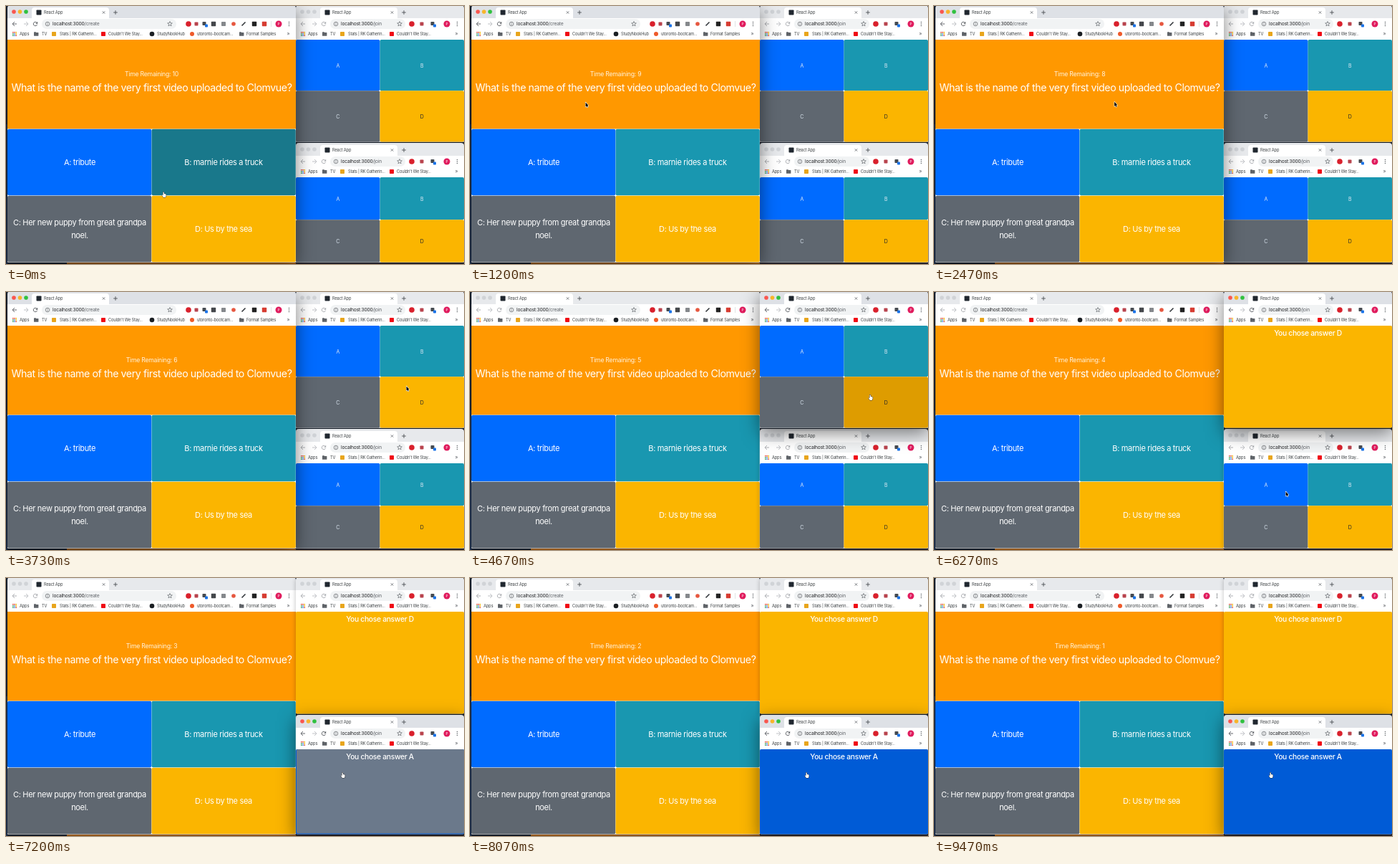
These frames come from a looping animation (640 by 360 pixels, 9540 ms). An HTML page with a canvas:

```html
<!DOCTYPE html>
<html lang="en">
<head>
<meta charset="utf-8">
<title>Quiz</title>
<style>
html, body { margin: 0; width: 100%; height: 100%; overflow: hidden; background: #17202e; }
canvas { display: block; width: 640px; height: 360px; }
</style>
</head>
<body>
<canvas id="stage"></canvas>
<script>
const LOOP = 9540;
const canvas = document.getElementById('stage');
const ctx = canvas.getContext('2d');
const ratio = window.devicePixelRatio || 1;
canvas.width = 640 * ratio;
canvas.height = 360 * ratio;

const COLORS = {
  A: ['#006bff', '#005bd6'],
  B: ['#1997b0', '#19788b'],
  C: ['#5f6770', '#50575f'],
  D: ['#fbb500', '#de9c00']
};
const WINDOWS = [
  { x: 2, y: -1, w: 403, h: 358.5, path: 'create' },
  { x: 405, y: -1, w: 235, h: 190.5, path: 'join' },
  { x: 405, y: 191, w: 235, h: 166.5, path: 'join' }
];
const FOCUS_TIMES = [4450, 6800];
const CHOICES = [null, { at: 4700, answer: 'D' }, { at: 7100, answer: 'A' }];
const CURSOR = [
  [0, 221, 263], [950, 162, 138], [2100, 162, 138], [3300, 560, 135], [3900, 560, 135],
  [4350, 560, 147], [5250, 560, 147], [6100, 492, 282], [6400, 492, 282], [6800, 471, 275]
];

function rect(x, y, w, h, color, r = 0) {
  ctx.fillStyle = color;
  ctx.beginPath();
  ctx.roundRect(x, y, w, h, r);
  ctx.fill();
}

function dot(x, y, r, color) {
  ctx.fillStyle = color;
  ctx.beginPath();
  ctx.arc(x, y, r, 0, Math.PI * 2);
  ctx.fill();
}

function square(x, y, size, color) {
  rect(x - size / 2, y - size / 2, size, size, color, 0.8);
}

function stroke(points, color, width = 0.9) {
  ctx.strokeStyle = color;
  ctx.lineWidth = width;
  ctx.beginPath();
  points.forEach(([x, y]) => ctx.lineTo(x, y));
  ctx.stroke();
}

function text(str, x, y, size, color, align = 'left', weight = 400) {
  ctx.font = `${weight} ${size}px Inter, "Liberation Sans", sans-serif`;
  ctx.letterSpacing = `${-0.03 * size}px`;
  ctx.textAlign = align;
  ctx.fillStyle = color;
  ctx.fillText(str, x, y + size * 0.36);
}

function mix(a, b, k) {
  const part = (c, i) => parseInt(c.slice(i, i + 2), 16);
  return `rgb(${[1, 3, 5].map(i => Math.round(part(a, i) + (part(b, i) - part(a, i)) * k))})`;
}

const clamp = v => Math.min(1, Math.max(0, v));

function cursorAt(t) {
  const next = CURSOR.findIndex(key => key[0] > t);
  if (next < 0) return CURSOR.at(-1).slice(1);
  const [t0, x0, y0] = CURSOR[next - 1];
  const [t1, x1, y1] = CURSOR[next];
  const p = (t - t0) / (t1 - t0);
  const k = p * p * (3 - 2 * p);
  return [x0 + (x1 - x0) * k, y0 + (y1 - y0) * k];
}

function star(x, y) {
  const points = [];
  for (let i = 0; i <= 10; i++) {
    const a = -Math.PI / 2 + i * Math.PI / 5;
    const r = i % 2 ? 1.5 : 3.5;
    points.push([x + r * Math.cos(a), y + r * Math.sin(a)]);
  }
  stroke(points, '#5f6368', 0.7);
}

function arrow(x, y, dir, color) {
  stroke([[x - 3 * dir, y], [x + 3 * dir, y]], color);
  stroke([[x, y - 3], [x + 3 * dir, y], [x, y + 3]], color);
}

function reload(x, y, color) {
  ctx.strokeStyle = color;
  ctx.lineWidth = 0.9;
  ctx.beginPath();
  ctx.arc(x, y, 2.7, 0.3, 5.5);
  ctx.stroke();
  ctx.fillStyle = color;
  ctx.beginPath();
  ctx.moveTo(x + 3.2, y - 3.2);
  ctx.lineTo(x + 3.2, y - 0.3);
  ctx.lineTo(x + 0.3, y - 0.3);
  ctx.fill();
}

function folder(x, y) {
  rect(x - 3, y - 2.7, 3, 2, '#5f6368', 0.5);
  rect(x - 3, y - 2, 6.4, 4.8, '#5f6368', 0.6);
}

function appsGrid(x, y) {
  const hues = ['#e24a3b', '#e24a3b', '#f0b400', '#34a05a', '#4285e8', '#f0b400', '#34a05a', '#4285e8', '#e24a3b'];
  hues.forEach((c, i) => rect(x - 3 + (i % 3) * 2.2, y - 3 + Math.floor(i / 3) * 2.2, 1.6, 1.6, c));
}

function badge(x, y) {
  square(x - 1, y - 0.5, 5, '#454a50');
  rect(x, y + 0.5, 4, 4, '#1a73e8', 0.8);
}

function bookmarks(x, y, wide) {
  const label = (str, dx) => text(str, x + dx, y, 5.7, '#3c4043');
  appsGrid(x + 10, y);
  label('Apps', 17);
  folder(x + 40, y);
  label('TV', 48);
  square(x + 65, y, 6, '#e8a51c');
  label('Stats | RK Gatherin...', 73);
  square(x + 134, y, 6, '#f00a14');
  label("Couldn't We Stay...", 141);
  if (!wide) return;
  dot(x + 202, y, 3.3, '#1b1f23');
  label('StudyNookHub', 209);
  dot(x + 258, y, 3, '#ee5a2a');
  label('utoronto-bootcam...', 265);
  folder(x + 327, y);
  label('Format Samples', 334);
}

function extensions(win, y) {
  const wide = win.path === 'create';
  const x = wide ? 255 : 567;
  dot(x, y, 3.8, '#d9202c');
  square(x + (wide ? 11 : 14), y, 5, '#b8434d');
  badge(x + (wide ? 23 : 30), y);
  if (!wide) return;
  square(290, y, 6.4, '#44474b');
  square(304, y, 6, '#85888c');
  dot(318, y, 2.8, '#e6573f');
  stroke([[329.5, 27.5], [334.5, 22.5]], '#33373b', 1.6);
  square(347, y, 6.4, '#222');
  square(361, y, 6.4, '#d63c32');
  stroke([[370.5, y - 4], [370.5, y + 4]], '#d5d7da', 0.7);
}

function chrome(win, focused) {
  const { x, y, w } = win;
  const wide = win.path === 'create';
  const right = x + w;
  const row = y + 26;
  const lights = focused ? ['#f9564f', '#f8b52a', '#2fc13f'] : ['#d0d3d7', '#d0d3d7', '#d0d3d7'];
  const ink = focused ? '#55595e' : '#a5a8ac';

  ctx.save();
  ctx.shadowColor = focused ? 'rgba(0,0,0,.5)' : 'rgba(0,0,0,.25)';
  ctx.shadowBlur = (focused ? 24 : 6) * ratio;
  ctx.shadowOffsetY = (focused ? 7 : 2) * ratio;
  rect(x, y, w, win.h, focused ? '#dee1e6' : '#e7e9ec', [4, 4, 2, 2]);
  ctx.restore();

  lights.forEach((c, i) => dot(x + 9 + i * 8.5, y + 9, 2.8, c));
  rect(x + 34, y + 3, 108, 16, '#fff', [4, 4, 0, 0]);
  square(x + 44, y + 10, 7, '#20272f');
  text('React App', x + 51, y + 10, 5.7, '#3c4043');
  const cx = x + 134.5, cy = y + 10;
  stroke([[cx - 1.7, cy - 1.7], [cx + 1.7, cy + 1.7]], '#5f6368', 0.8);
  stroke([[cx - 1.7, cy + 1.7], [cx + 1.7, cy - 1.7]], '#5f6368', 0.8);
  const px = x + 151;
  stroke([[px - 2.8, cy], [px + 2.8, cy]], '#4a4e53');
  stroke([[px, cy - 2.8], [px, cy + 2.8]], '#4a4e53');

  rect(x, y + 18, w, 30, '#fff');
  arrow(x + 10, row, -1, ink);
  arrow(x + 26, row, 1, '#b9bcc0');
  reload(x + 39, row, ink);
  rect(x + 48, row - 7, wide ? 188 : 105, 14, '#f1f3f4', 7);
  ctx.strokeStyle = '#5f6368';
  ctx.lineWidth = 0.7;
  ctx.beginPath();
  ctx.arc(x + 56, row, 2.8, 0, Math.PI * 2);
  ctx.stroke();
  stroke([[x + 56, row - 0.4], [x + 56, row + 1.6]], '#5f6368', 0.7);
  rect(x + 55.6, row - 1.7, 0.8, 0.8, '#5f6368');
  const host = 'localhost:3000';
  text(host, x + 63, row, 6.7, '#202124');
  const hostWidth = ctx.measureText(host).width;
  text('/' + win.path, x + 63 + hostWidth, row, 6.7, '#5f6368');
  star(wide ? 229 : 550, row);
  extensions(win, row);
  dot(right - 24, row, 4.5, '#e01b5d');
  text('P', right - 24, row, 4.8, '#fff', 'center');
  for (let i = -1; i < 2; i++) dot(right - 9.5, row + i * 2.4, 0.75, '#5f6368');
  bookmarks(x, y + 40, wide);
  text('»', right - 10.5, y + 39.5, 7, '#5f6368', 'center');
}

function button(key, x, y, w, h, hovered) {
  rect(x, y, w, h, COLORS[key][hovered ? 1 : 0], 2);
}

function quadrants(left, top, width, height) {
  return ['A', 'B', 'C', 'D'].map((key, i) => {
    const w = width / 2, h = height / 2;
    return { key, x: left + (i % 2) * w, y: top + (i >> 1) * h, w, h };
  });
}

const inside = (box, [x, y]) => x >= box.x && x < box.x + box.w && y >= box.y && y < box.y + box.h;

function host(t, focused, pointer) {
  rect(2, 47, 403, 310.5, '#fff');
  rect(2, 47, 403, 124.5, '#ff9800');
  const count = 10 - Math.floor((t + 400) / 1000);
  text(`Time Remaining: ${count}`, 203.5, 95, 8.7, '#fff2dd', 'center');
  text('What is the name of the very first video uploaded to Clomvue?', 203.5, 113.5, 14.2, '#fff', 'center');
  quadrants(2, 171.5, 403, 186).forEach(b => {
    button(b.key, b.x, b.y + 0.3, b.w - 0.2, b.h - 0.6, focused && inside(b, pointer));
  });
  const answer = (str, x, y) => text(str, x, y, 11, '#fff', 'center');
  answer('A: tribute', 103, 218.5);
  answer('B: marnie rides a truck', 304, 218.5);
  answer('C: Her new puppy from great grandpa', 103, 302.5);
  answer('noel.', 103, 320);
  answer('D: Us by the sea', 304, 311.5);
}

function player(win, t, focused, pointer, choice) {
  const top = win.y + 48;
  const height = win.y + win.h - top;
  const area = { x: win.x, y: top, w: win.w, h: height };
  if (t < choice.at) {
    rect(area.x, area.y, area.w, area.h, '#fff');
    quadrants(area.x, area.y, area.w, area.h).forEach(b => {
      button(b.key, b.x, b.y, b.w, b.h, focused && inside(b, pointer));
      text(b.key, b.x + b.w / 2, b.y + b.h / 2 + 0.5, 7, b.key === 'D' ? '#212529' : '#dfeaf5', 'center');
    });
    return;
  }
  const [plain, dark] = COLORS[choice.answer];
  const fill = focused && inside(area, pointer) ? dark : plain;
  rect(area.x, area.y, area.w, area.h, fill, 2);
  if (choice.answer === 'A') {
    const settle = clamp((t - 7230) / 150);
    if (settle < 1) rect(area.x + 1, area.y, area.w - 1, area.h - 1, mix('#6b798b', fill, settle), 2);
  }
  text(`You chose answer ${choice.answer}`, 522.5, top + 10.5, 10.3, '#fff', 'center', 500);
}

function desktop() {
  rect(0, 0, 640, 360, '#17202e');
  rect(0, 165, 2, 195, '#1d2f4c');
  rect(85, 357.5, 320, 2.5, '#a8641f');
  rect(405, 357.5, 235, 2.5, '#2a2730');
}

function drawPointer([x, y], hand) {
  ctx.save();
  ctx.translate(x, y);
  const shape = hand
    ? [[-1.5, -3.5], [-0.3, -3.5], [0, -1], [2.6, -0.4], [2.6, 2], [1.8, 4], [-1.2, 4], [-3, 1], [-2.3, 0.3], [-1.5, 1]]
    : [[-0.5, -4], [-0.5, 3], [1, 1.7], [2, 4], [3.1, 3.4], [2.1, 1.3], [4, 1.1]].map(([a, b]) => [a * 0.9, b * 0.9]);
  ctx.beginPath();
  shape.forEach(([a, b]) => ctx.lineTo(a, b));
  ctx.closePath();
  ctx.lineJoin = 'round';
  ctx.lineWidth = hand ? 0.8 : 1.1;
  ctx.strokeStyle = hand ? '#111' : '#fff';
  ctx.stroke();
  ctx.fillStyle = hand ? '#fff' : '#000';
  ctx.fill();
  ctx.restore();
}

function draw(t) {
  ctx.setTransform(ratio, 0, 0, ratio, 0, 0);
  const focus = FOCUS_TIMES.filter(at => t >= at).length;
  const pointer = cursorAt(t);
  desktop();
  const order = [0, 1, 2].filter(i => i !== focus).concat(focus);
  order.forEach(i => {
    const win = WINDOWS[i];
    const focused = i === focus;
    chrome(win, focused);
    if (i === 0) host(t, focused, pointer);
    else player(win, t, focused, pointer, CHOICES[i]);
  });
  const win = WINDOWS[focus];
  const contentTop = focus === 0 ? 171.5 : win.y + 48;
  drawPointer(pointer, inside({ ...win, y: contentTop, h: win.y + win.h - contentTop }, pointer));
}

const start = performance.now();
function tick() {
  draw((performance.now() - start) % LOOP);
  requestAnimationFrame(tick);
}
tick();
</script>
</body>
</html>
```
